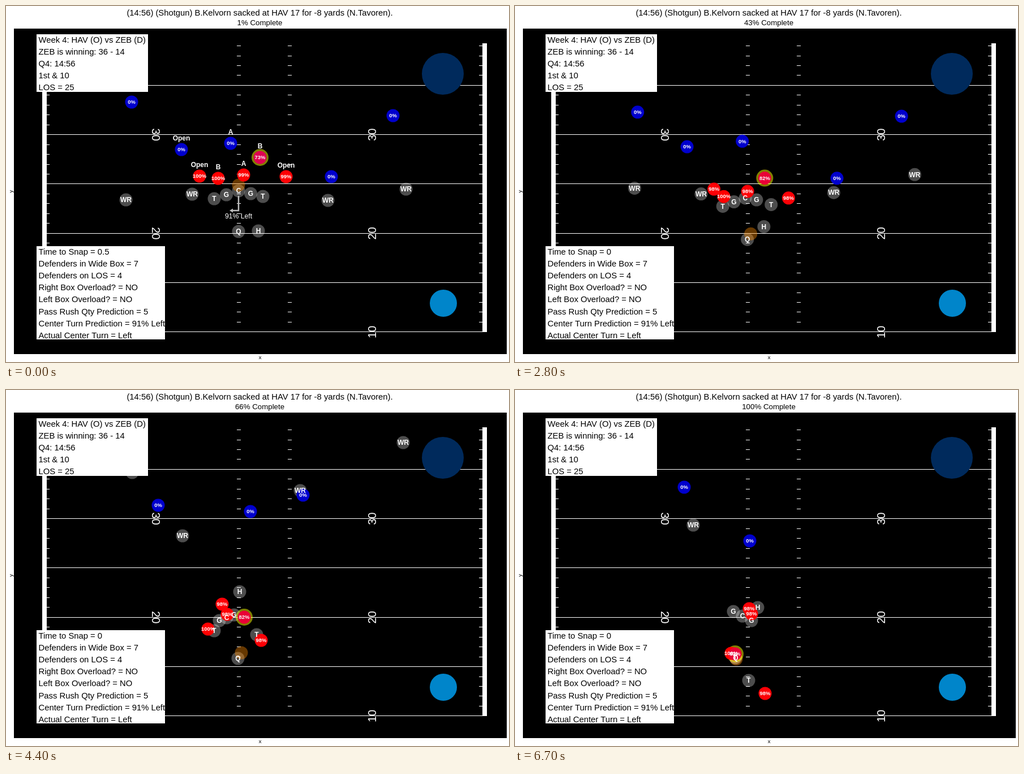
These frames come from a looping animation (889x630 px, 6.8 s). An HTML page with a canvas:

```html
<!DOCTYPE html>
<html lang="en">
<head>
<meta charset="utf-8">
<title>Play animation</title>
<style>
html, body { margin: 0; width: 100%; height: 100%; overflow: hidden; background: #fff; }
canvas { display: block; }
</style>
</head>
<body>
<canvas id="stage" width="889" height="630"></canvas>
<script>
const ctx = document.getElementById('stage').getContext('2d');
const LOOP = 6800, STEP = 100;
// The clock reaches zero at SET, the pose is held, and the play starts at HIKE.
const SET = 500, HIKE = 2000, KEYS = [4400, 5300, 6700];
const TOP = 62, YARD = 17.46, RADIUS = 11.5;

const clamp = x => Math.min(1, Math.max(0, x));
const mix = (a, b, k) => a + (b - a) * k;
const smooth = k => k * k * (3 - 2 * k);

// Curve through v at the given times; after the last one it runs straight on.
function curve(times, v, burst) {
  const last = v.length - 1;
  const rate = (i, j) => (v[j] - v[i]) / (times[j] - times[i]);
  const m = v.map((_, i) => i ? i < last && rate(i - 1, i + 1) : burst * rate(0, 1));
  m[last] = 2 * rate(last - 1, last) - m[last - 1];
  return t => {
    if (t <= times[0]) return v[0];
    if (t >= times[last]) return v[last] + m[last] * (t - times[last]);
    let i = 0;
    while (t >= times[i + 1]) i++;
    const d = times[i + 1] - times[i], u = (t - times[i]) / d, w = 1 - u;
    return mix(v[i], v[i + 1], smooth(u)) + d * u * w * (w * m[i] - u * m[i + 1]);
  };
}

// A run starts after a delay; burst is the share of full speed at the first step.
function run(delay, burst, pts) {
  const times = [HIKE + delay, ...KEYS];
  const [x, y] = [0, 1].map(k => curve(times, pts.map(p => p[k]), burst));
  return t => [x(t), y(t)];
}

const offense = [], defense = [];
function off(name, delay, ...pts) {
  const at = run(delay, 0, pts);
  offense.push({ name, at });
  return at;
}
function drop(label, ...pts) {
  defense.push({ label, from: 0, to: 0, at: run(200, 0, pts) });
}
// A corner's gap to his receiver changes evenly until the given time.
function cover(receiver, until, gap, close) {
  const at = t => {
    const k = clamp((t - HIKE) / (until - HIKE));
    return receiver(t).map((v, i) => v + mix(gap[i], close[i], k));
  };
  defense.push({ label: '', from: 0, to: 0, at });
}
// Rushers creep two pixels forward before the snap.
function rush(label, from, to, ...pts) {
  const path = run(0, 0.5, pts);
  const at = t => {
    const [x, y] = path(t);
    return [x, y - 2 * clamp(1 - t / SET)];
  };
  defense.push({ label, from, to, at });
  return at;
}

const outside = off('WR', 300, [212, 343], [223, 146], [287, 90]);
off('WR', 700, [329, 333], [312, 258], [309, 201], [315, 239]);
const slot = off('WR', 350, [569, 344], [520, 178], [553, 90]);
const deep = off('WR', 0, [707, 324], [702, 93]);

const spot = i => [411 + 21.5 * i, 327 + 6 * Math.abs(i) - i];
off('T', 100, spot(-2), [368, 426], [385, 458], [389, 473]);
for (const i of [-1, 0, 1])
  off(i ? 'G' : 'C', 100, spot(i), [390 + 13 * i, 403 - 5 * i], [398 + 14 * i, 412 - 4 * i], [402 + 16 * i, 400 + 8 * i]);
off('T', 100, spot(2), [443, 433], [429, 485], [413, 514]);
const passer = off('Q', 100, [411, 399], [410, 475], [413, 456], [390, 474]);
off('H', 100, [446, 398], [413, 357], [420, 364], [429, 385]);

cover(outside, 5300, [10, -173], [-9, -15]);
cover(slot, 4400, [6, -42], [5, 8]);
cover(deep, 4400, [-23, -130], [-24, -50]);
drop('Open', [310, 254], [269, 204], [269, 145], [299, 172]);
drop('A', [397, 243], [432, 215], [440, 205], [415, 267]);
rush('Open', 100, 98, [342, 303], [382, 379], [411, 382], [414, 387]);
rush('B', 100, 100, [375, 307], [357, 423], [375, 464], [382, 466]);
rush('A', 99, 98, [420, 301], [391, 397], [406, 393], [418, 396]);
rush('Open', 99, 98, [495, 304], [451, 443], [438, 500], [442, 537]);
const blitz = rush('B', 73, 82, [449, 270], [421, 402], [418, 445], [389, 467]);

// The ball flies back from the centre, then stays beside the passer.
function ball(t) {
  const [cx, cy] = spot(0), [qx, qy] = passer(t);
  const k = smooth(clamp((t - HIKE) / 700)), held = clamp((5300 - t) / 900);
  return [mix(cx, qx + 1 + 5 * held, k), mix(cy - 10 * clamp(1 - t / SET), qy + 2 - 12 * held, k)];
}

function rect(x, y, w, h, color) {
  ctx.fillStyle = color;
  ctx.fillRect(x, y, w, h);
}

function disc([x, y], r, color) {
  ctx.fillStyle = color;
  ctx.beginPath();
  ctx.arc(x, y, r, 0, 7);
  ctx.fill();
}

// Text centred vertically on y by its capital height.
function text(str, x, y, size, color = '#fff', weight = 400, align = 'center') {
  ctx.font = `${weight} ${size}px "Liberation Sans", Arial, sans-serif`;
  ctx.textAlign = align;
  ctx.fillStyle = color;
  ctx.fillText(str, x, y + size * 0.35);
}

function turned(str, x, y, size, turn, color) {
  ctx.save();
  ctx.translate(x, y);
  ctx.rotate(turn * Math.PI / 2);
  text(str, 0, 0, size, color);
  ctx.restore();
}

function panel(x, y, w, h, lines) {
  rect(x, y, w, h, '#fff');
  lines.forEach((s, i) => text(s, x + 3.5, y + 9.5 + i * 21.2, 14.8, '#000', 400, 'left'));
}

function field() {
  rect(14, 40, 871, 576, '#000');
  for (let i = 0; i < 30; i++) {
    const y = Math.floor(576.9 - i * YARD);
    if (i % 5 === 0) rect(72, y, 770, 1, '#fff');
    else for (const [x, w] of [[72, 5], [408, 7], [498, 7], [836, 6]]) rect(x, y, w, 1, '#fff');
  }
  for (const x of [64, 842]) rect(x, 66, 8, 511, '#fff');
  for (const n of [30, 20, 10]) {
    const y = 576.9 - (n - 10) * YARD;
    turned(n, 265, y, 20, 1);
    turned(n, 647, y, 20, -1);
  }
  disc([772, 120], 37, '#002a5c');
  disc([773, 526], 24, '#0085ca');
}

function arrow() {
  ctx.strokeStyle = ctx.fillStyle = '#bebebe';
  ctx.lineWidth = 2.5;
  ctx.beginPath();
  ctx.moveTo(411, 336);
  ctx.lineTo(411, 362);
  ctx.lineTo(399, 362);
  ctx.stroke();
  ctx.beginPath();
  ctx.moveTo(395, 362);
  ctx.lineTo(401, 358.5);
  ctx.lineTo(401, 365.5);
  ctx.fill();
  text('91% Left', 411, 372, 12.2);
}

const heat = p => p ? `rgb(${255 - 1.2 * (100 - p)},0,${3 * (100 - p)})` : '#0000cd';

// All discs lie below all lettering.
function players(t) {
  const early = t < SET;
  const shown = list => list.map(p => ({ ...p, pos: p.at(t) })).filter(p => p.pos[1] > TOP);
  const runners = shown(offense), defenders = shown(defense);
  for (const d of defenders) d.chance = Math.round(mix(d.from, d.to, clamp(t / SET)));

  for (const p of runners) disc(p.pos, RADIUS, 'rgba(255,255,255,.3)');
  disc(ball(t), RADIUS, 'rgba(255,140,0,.4)');
  if (early) arrow();
  disc(blitz(t), 15, 'rgba(255,255,0,.5)');
  for (const d of defenders) disc(d.pos, RADIUS, heat(d.chance));

  for (const p of runners) text(p.name, ...p.pos, 12, '#fff', 700);
  for (const { label, chance, pos: [x, y] } of defenders) {
    text(chance + '%', x, y, 9.4, '#fff', 700);
    if (early) text(label, x, y - 20.5, 12, '#fff', 700);
  }
}

function draw() {
  const frame = Math.floor(performance.now() % LOOP / STEP), t = frame * STEP;
  rect(0, 0, 889, 630, '#fff');
  text('(14:56) (Shotgun) B.Kelvorn sacked at HAV 17 for -8 yards (N.Tavoren).', 448.5, 12, 14.8, '#000');
  text(Math.round((frame + 1) * STEP / LOOP * 100) + '% Complete', 448.5, 29, 13.3, '#000');
  text('x', 449, 621.5, 9.5, '#000');
  turned('y', 9, 328, 9.5, -1, '#000');
  field();
  players(t);
  panel(54, 50, 197, 102, [
    'Week 4: HAV (O) vs ZEB (D)', 'ZEB is winning: 36 - 14', 'Q4: 14:56', '1st & 10', 'LOS = 25'
  ]);
  panel(54, 425, 227, 165, [
    'Time to Snap = ' + Math.max(0, SET - t) / 1000,
    'Defenders in Wide Box = 7', 'Defenders on LOS = 4',
    'Right Box Overload? = NO', 'Left Box Overload? = NO',
    'Pass Rush Qty Prediction = 5', 'Center Turn Prediction = 91% Left', 'Actual Center Turn = Left'
  ]);
  requestAnimationFrame(draw);
}
draw();
</script>
</body>
</html>
```
